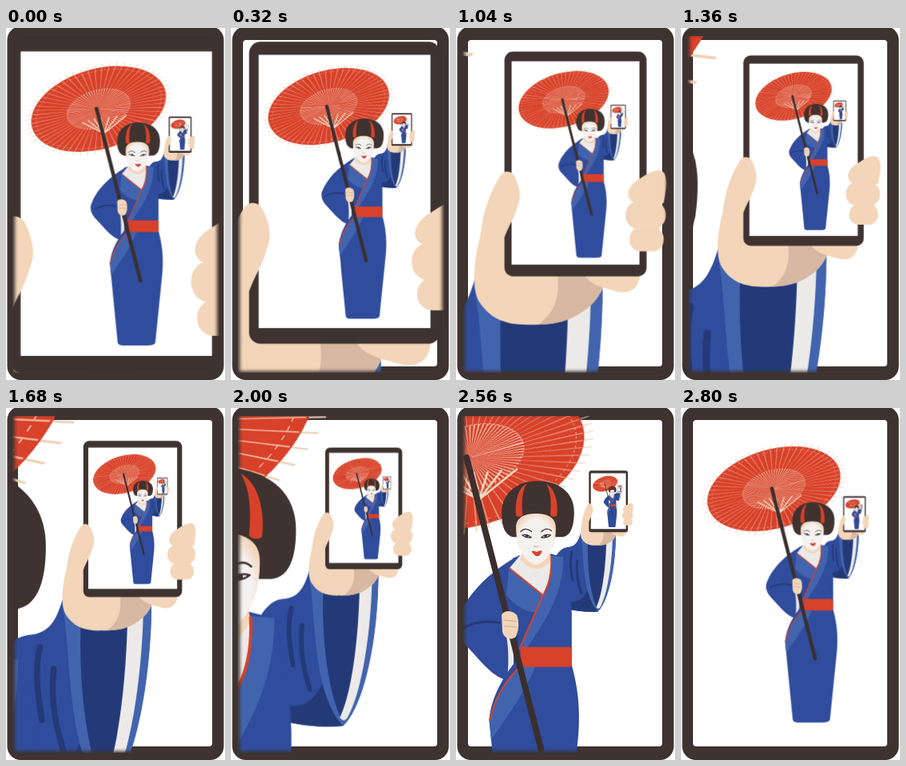
An HTML page without scripts that plays this animation: 274x440 px, repeating every 2.88 s.

```html
<!DOCTYPE html>
<html lang="en">
<head>
<meta charset="utf-8">
<title>Endless selfie</title>
<style>
  html, body { margin: 0; width: 100%; height: 100%; overflow: hidden; background: #fff; }
  svg { display: block; width: 274px; height: 440px; }
  .blue { fill: #304c9c; }
  .light { fill: #4264ae; }
  .deep { fill: #243a78; }
  .skin { fill: #f3d5b9; }
  .shade { fill: #d6b8a3; }
  .red { fill: #d8412a; }
  .dark { fill: #3e3330; }
  .pale { fill: #eceae9; }
  .line { fill: none; stroke-linecap: round; stroke-linejoin: round; }

  /* Scale shrinks evenly; the position follows the raised phone. */
  #zoom { animation: zoom 2880ms -4ms infinite; }
  @keyframes zoom {
    0%      { transform: translate(138px, 220px) scale(2.66); animation-timing-function: steps(8); }
    22.222% { transform: translate(146px, 189.5px) scale(2.117); animation-timing-function: steps(5); }
    36.111% { transform: translate(149.5px, 169px) scale(1.778); animation-timing-function: steps(4); }
    47.222% { transform: translate(153.3px, 152.5px) scale(1.506); animation-timing-function: steps(4); }
    58.333% { transform: translate(158.5px, 138px) scale(1.235); animation-timing-function: steps(4); }
    69.444% { transform: translate(166px, 125px) scale(.963); animation-timing-function: steps(4); }
    80.555% { transform: translate(177.5px, 116px) scale(.691); animation-timing-function: steps(2); }
    86.111% { transform: translate(185px, 114.8px) scale(.555); animation-timing-function: steps(2); }
    91.666% { transform: translate(196.2px, 118.1px) scale(.42); animation-timing-function: steps(1); }
    94.444% { transform: translate(204.7px, 123.2px) scale(.352); animation-timing-function: steps(1); }
    97.222%, 100% { transform: translate(217px, 132.5px) scale(.284); }
  }
</style>
</head>
<body>
<svg viewBox="0 0 274 440">
  <defs>
    <clipPath id="view"><rect x="8" y="10" width="259" height="421"/></clipPath>
    <filter id="soft"><feGaussianBlur stdDeviation="2"/></filter>
    <mask id="fade" maskUnits="userSpaceOnUse" x="0" y="0" width="274" height="440">
      <rect x="11" y="9" width="253" height="420" fill="#fff" filter="url(#soft)"/>
    </mask>
    <radialGradient id="powder" cx=".5" cy=".52" r=".56">
      <stop offset=".72" stop-color="#f4f2f1"/>
      <stop offset="1" stop-color="#f3d5b9"/>
    </radialGradient>

    <g id="umbrella">
      <g transform="translate(-355 -111) rotate(-16) scale(3.01 1.74)" fill="none">
        <circle r="104" stroke="#efd3b8" stroke-width="8" pathLength="360" stroke-dasharray=".7 5.3"/>
        <circle r="100" class="red"/>
        <circle r="72" stroke="#f0b49c" stroke-width="54" pathLength="360" stroke-dasharray=".6 5.4"/>
        <circle r="93" stroke="#f0b49c" stroke-width=".7" pathLength="360" stroke-dasharray="2 2"/>
        <circle r="24" stroke="#f3d9c2" stroke-width="46" pathLength="360" stroke-dasharray="1.4 3.6"/>
        <circle r="47" stroke="#f3d9c2" stroke-width="1" pathLength="360" stroke-dasharray="2 3"/>
      </g>
      <path class="line" stroke="#f3d9c2" stroke-width="5"
        d="M-332 -4L-425 -52M-332 -4L-400 -60M-332 -4L-375 -68M-332 -4L-345 -72M-332 -4L-310 -74M-332 -4L-275 -78M-332 -4L-235 -82"/>
    </g>

    <g id="robe">
      <path class="blue" d="M-229 139C-270 160 -350 215 -383 293C-397 320 -388 346 -365 370C-335 400 -300 450 -262 458L-225 420V300L-160 150z"/>
      <path class="deep" d="M-262 300C-252 340 -250 400 -258 452L-243 440L-225 340z"/>
      <path class="pale" d="M-262 345C-255 380 -256 425 -260 457L-248 458C-240 425 -242 385 -250 345z"/>
      <path class="line" stroke="#243a78" stroke-width="6" d="M-372 325C-345 310 -310 305 -280 312"/>
      <path class="blue" d="M-245 145L-148 135L-116 143C-104 180 -96 230 -94 290V420C-78 480 -72 530 -77 600L-108 905C-112 915 -122 917 -140 918H-245C-262 918 -270 914 -272 905L-306 560C-300 500 -270 450 -230 400z"/>
      <path class="light" d="M-225 424C-262 455 -298 515 -306 560L-301 612C-270 565 -215 495 -188 424z"/>
      <path class="line" stroke="#d8412a" stroke-width="4" d="M-226 424C-262 455 -294 510 -304 560"/>
      <path class="light" d="M-255 172L-168 241L-187 285C-210 285 -240 268 -262 240zM-147 140L-116 143C-116 230 -150 290 -208 375H-226L-168 241C-152 215 -145 175 -147 140z"/>
    </g>

    <g id="head">
      <path class="dark" d="M-182 -52C-130 -52 -88 -25 -88 28C-88 65 -97 90 -120 92H-245C-268 85 -274 60 -274 30C-274 -20 -235 -52 -182 -52z"/>
      <path class="pale" d="M-254 172L-215 125H-155L-147 142C-145 180 -152 215 -168 241z"/>
      <path class="skin" d="M-218 125H-150L-148 148C-165 182 -200 180 -226 150z"/>
      <path class="line" stroke="#d8412a" stroke-width="4" d="M-254 172L-168 241C-152 215 -145 180 -147 142M-168 241L-228 378"/>
      <path fill="url(#powder)" d="M-237 68C-237 42 -216 32 -186 32C-156 32 -135 42 -135 68C-134 112 -152 152 -184 165C-220 155 -237 112 -237 68z"/>
      <path class="red" d="M-160 -45C-138 -33 -128 0 -132 37C-138 42 -145 40 -149 36C-146 0 -148 -25 -160 -45zM-210 -45C-232 -33 -240 0 -237 37C-231 42 -224 40 -220 36C-223 0 -221 -25 -210 -45z"/>
      <g class="line" stroke="#3e3330" stroke-width="2.6">
        <path d="M-225 78Q-214 65 -197 78M-172 78Q-158 65 -146 76"/>
        <path fill="#fff" d="M-221 87Q-209 83 -198 93Q-211 95 -221 87zM-172 93Q-162 83 -148 87Q-158 95 -172 93z"/>
      </g>
      <g class="dark"><circle cx="-209" cy="89" r="4"/><circle cx="-161" cy="89" r="4"/></g>
      <path class="line" stroke="#d6b8a3" stroke-width="2.5" d="M-191 115Q-185 120 -179 115"/>
      <path class="red" d="M-197 128Q-190 127 -184 130Q-178 126 -170 127Q-174 141 -184 141Q-191 139 -197 128z"/>
    </g>

    <g id="sleeve">
      <path class="blue" d="M-70 78C-77 104 -85 117 -106 118C-122 120 -132 135 -140 150L-110 275C-80 283 -50 285 -27 283C3 255 20 150 19 80z"/>
      <path class="deep" d="M-112 254C-88 262 -66 256 -54 228L-27 283C-50 285 -80 283 -112 275z"/>
      <path class="light" d="M-72 85C-61 130 -70 235 -27 283C3 255 20 160 19 78z"/>
      <path class="deep" d="M-52 90C-56 160 -48 235 -29 274C-10 230 -2 150 -2 78z"/>
      <path class="pale" d="M-5 80C-5 150 -13 235 -31 272Q-25 280 -20 270C-1 235 11 150 11 78z"/>
      <path class="line" stroke="#243a78" stroke-width="6" d="M-94 130C-100 155 -96 180 -92 204M-80 152C-84 190 -76 215 -70 236"/>
    </g>

    <g id="back">
      <use href="#umbrella"/>
      <use href="#sleeve"/>
      <use href="#robe"/>
      <use href="#head"/>
      <rect class="red" x="-226" y="374" width="132" height="51" rx="6"/>
      <path class="line" stroke="#3a2f2e" stroke-width="16" d="M-364 -112L-173 636"/>
      <path class="skin" d="M-274 292C-268 278 -246 280 -235 292C-228 310 -230 335 -238 348C-250 358 -268 352 -272 335z"/>
      <path class="line" stroke="#d6b8a3" stroke-width="3" d="M-266 305L-237 308M-266 320L-236 323"/>
      <path class="skin" d="M-53 9L-67 51C-72 70 -73 88 -68 97C-60 110 -48 114 -32 113.5C-15 114 -3 110 4 105C14 99 20 90 22 78L-40 27z"/>
      <path class="shade" d="M-13 76C-11 92 -13 104 -26 113.4C-13 113.5 -3 110 4 105C14 99 20 90 22 76z"/>
      <path class="skin" d="M5 76C8 86 22 88 31 90.5C40 92 46 86 45 76z"/>
      <rect class="dark" x="-50" y="-78.5" width="100" height="158" rx="6"/>
      <rect fill="#fff" x="-45" y="-71.7" width="90" height="143"/>
    </g>

    <g id="fingers" class="skin">
      <path d="M-53 9C-50 4 -44 5 -42 11C-39 18 -38 24 -41 31C-43 38 -47 44 -50 52L-67 51C-65 34 -61 22 -53 9z"/>
      <path d="M42 28C34 25 36 16 45 11C51 7 57 3 61.5 6C65 9 64 18 62 28z"/>
      <rect x="35.2" y="26.5" width="28.3" height="20" rx="9.5"/>
      <rect x="38" y="45" width="24" height="17" rx="8"/>
      <path d="M42 26H60V30H42zM43 44H59V48H43z"/>
    </g>

    <g id="far"><use href="#back"/><use href="#fingers"/></g>
    <g id="middle">
      <use href="#back"/>
      <use href="#far" transform="translate(30 -32.7) scale(.108)"/>
      <use href="#fingers"/>
    </g>
  </defs>

  <rect class="dark" x="1.5" y="-2" width="271" height="442" rx="17"/>
  <rect fill="#fff" x="15" y="15" width="243" height="408" rx="4"/>
  <g clip-path="url(#view)" mask="url(#fade)">
    <g id="zoom">
      <use href="#back"/>
      <use href="#middle" transform="translate(30 -32.7) scale(.108)"/>
      <use href="#fingers"/>
    </g>
  </g>
</svg>
</body>
</html>
```
